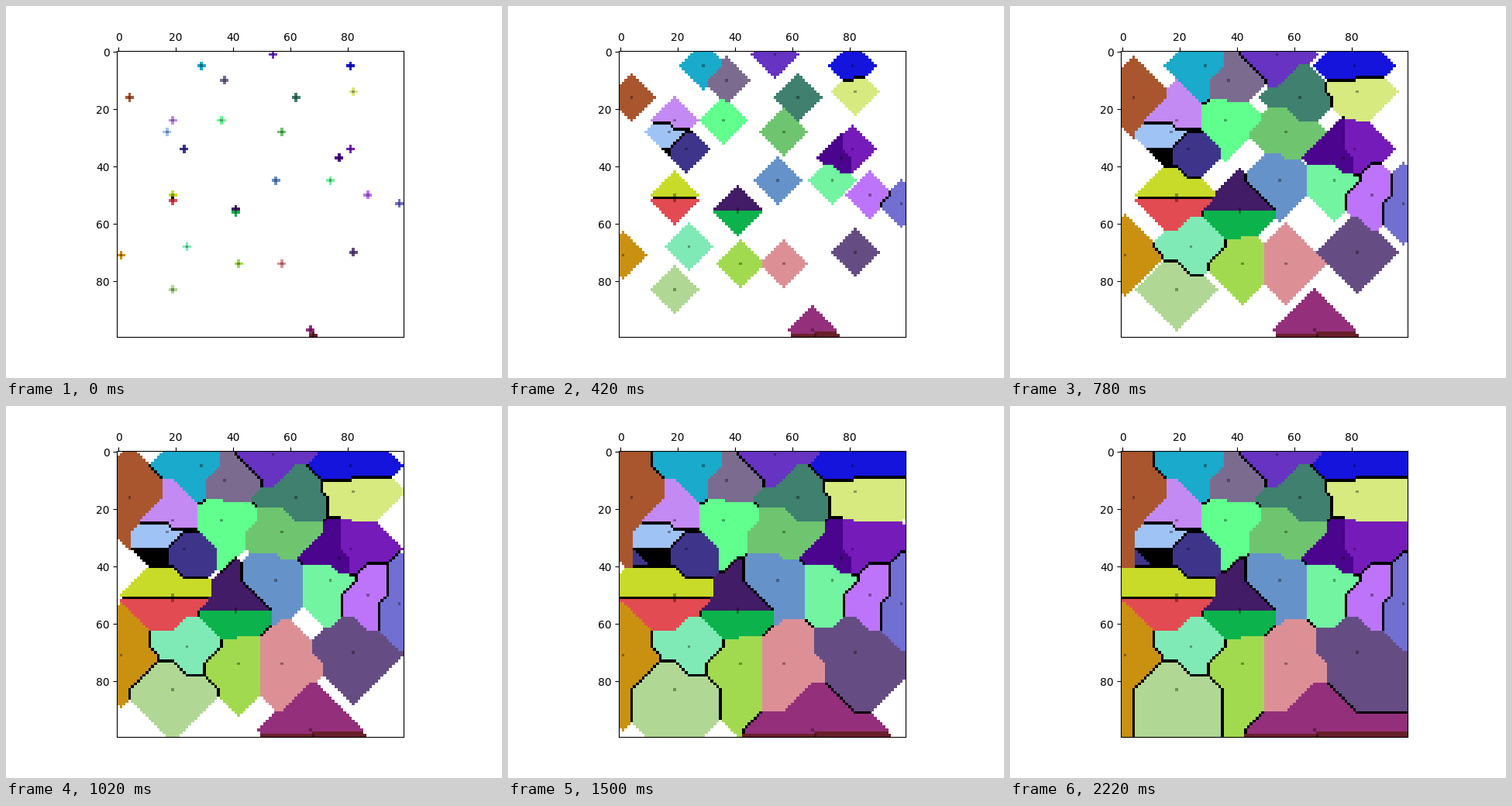
Recreate the animation shown at these times as a matplotlib script. Size 640x480 px, loop 6 s.

```python
import numpy as np
import matplotlib.pyplot as plt
from matplotlib.animation import FuncAnimation
from matplotlib.colors import to_rgb

SIZE = 100
FRAMES, INTERVAL = 100, 60
LAST_RADIUS = 38

SEEDS = [
    (54, 1, "#6633c2"), (29, 5, "#1aaacb"), (81, 5, "#1414dc"),
    (37, 10, "#7b6c8f"), (82, 14, "#d6ea80"), (4, 16, "#a9562e"),
    (62, 16, "#3f806f"), (19, 24, "#c48af3"), (36, 24, "#60ff8e"),
    (17, 28, "#a0c3f6"), (57, 28, "#6fc56f"), (23, 34, "#3e358b"),
    (81, 34, "#751bb9"), (77, 37, "#4b048d"), (55, 45, "#6692ca"),
    (74, 45, "#72f4a1"), (19, 50, "#c8db28"), (87, 50, "#be74fa"),
    (19, 52, "#e34b52"), (98, 53, "#726fd3"), (41, 55, "#421c66"),
    (41, 56, "#0cb24b"), (24, 68, "#7feab5"), (82, 70, "#654d84"),
    (1, 71, "#ca9111"), (42, 74, "#a2da4f"), (57, 74, "#dc9096"),
    (19, 83, "#b0d894"), (67, 97, "#942f7b"), (68, 99, "#66202a"),
]
COLORS = np.array([to_rgb(c) for _, _, c in SEEDS])


def grow():
    """Return the final picture and the radius at which each cell fills."""
    rows, cols = np.mgrid[:SIZE, :SIZE]
    dist = np.array([abs(cols - x) + abs(rows - y) for x, y, _ in SEEDS])
    born = np.full((SIZE, SIZE), LAST_RADIUS + 1)
    image = np.ones((SIZE, SIZE, 3))
    alive = np.ones(len(SEEDS), bool)

    for (x, y, _), color in zip(SEEDS, COLORS):
        image[y, x] = color * 0.65
        born[y, x] = 0

    for radius in range(1, LAST_RADIUS + 1):
        free = born > LAST_RADIUS
        hits = (dist == radius) & free & alive[:, None, None]
        count = hits.sum(axis=0)
        single, shared = count == 1, count > 1
        image[single] = COLORS[hits.argmax(axis=0)[single]]
        image[shared] = 0
        born[count > 0] = radius
        # a region that wins no cell stops growing
        alive &= (hits & single).any(axis=(1, 2))
    return image, born


final, born = grow()


def picture(frame):
    radius = min(frame + 1, LAST_RADIUS)
    return np.where((born <= radius)[..., None], final, 1.0)


fig, ax = plt.subplots(figsize=(6.4, 4.8), dpi=100)
view = ax.imshow(picture(0), interpolation="nearest")
ax.xaxis.tick_top()


def update(frame):
    view.set_data(picture(frame))
    return [view]


anim = FuncAnimation(fig, update, frames=FRAMES, interval=INTERVAL,
                     repeat=True, repeat_delay=0)
plt.show()
```
